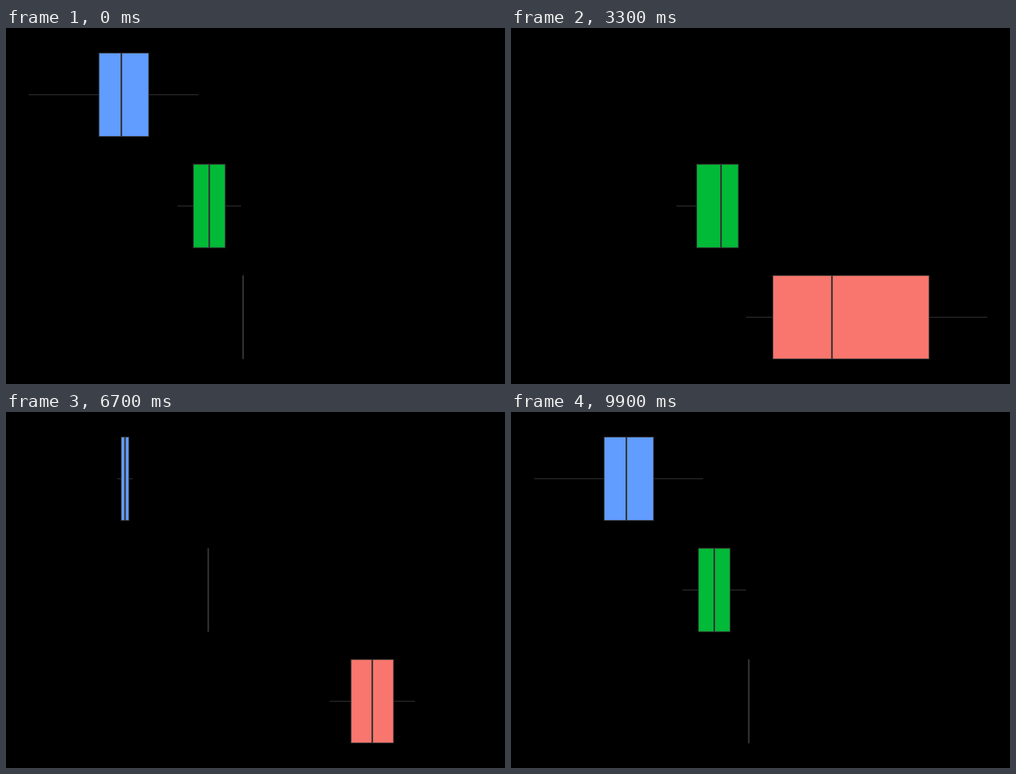
A matplotlib script that plays this animation: 885 px wide and 632 px high, repeating every 10000 ms.

```python
import math

import matplotlib.pyplot as plt
from matplotlib.animation import FuncAnimation
from matplotlib.patches import Rectangle

W, H, DPI = 885, 632, 64
FRAMES, INTERVAL = 100, 100
STEP = H / 3.2          # distance between the rows
HALF = 0.375 * STEP     # half the height of a box
INK = "#333333"
THIN, THICK = 1.42, 2.84

# Low whisker, quartiles and high whisker of each row in three states.
ROWS = [
    ("#619CFF", [(40.23, 164.9, 204.6, 253.1, 341.2), None,
                 (197.4, 204.25, 211.1, 217.95, 224.8)]),
    ("#00BA38", [(304, 332.25, 360.5, 388.75, 417),
                 (293.3, 329.3, 372.5, 403.2, 403.2), (358.7,) * 5]),
    ("#F8766D", [(420.5,) * 5, (417, 464.4, 569.2, 741.5, 844.77),
                 (574.2, 611.9, 649.6, 687.3, 725)]),
]
MOVES = [(11, 33), (45, 67), (79, 100)]  # first and last frame of each change


def px(width):
    return width * 72 / DPI


def progress(i):
    """State left, state approached and the eased share between them."""
    for n, (start, end) in enumerate(MOVES):
        if i < end:
            p = max(0, i - start) / (end - start)
            return n, (n + 1) % 3, (1 - math.cos(math.pi * p)) / 2
    return 0, 0, 0


def pose(states, i):
    """Five numbers and opacity; boxes leave by shrinking, enter by fading."""
    n, m, e = progress(i)
    a, b = states[n], states[m]
    if a is None:
        return b, e
    if b is None:
        b = (a[2],) * 5
    return [u + (v - u) * e for u, v in zip(a, b)], 1


class Box:
    def __init__(self, ax, row, color, states):
        self.states = states
        self.y = (0.6 + row) * STEP
        self.whiskers = [self.line(ax, THIN, 1 + 0.1 * k) for k in (0, 1)]
        self.rect = ax.add_patch(Rectangle(
            (0, self.y - HALF), 0, 2 * HALF, facecolor=color, edgecolor=INK,
            linewidth=px(THIN), joinstyle="miter", snap=False, zorder=2))
        self.median = self.line(ax, THICK, 3)
        self.parts = [*self.whiskers, self.rect, self.median]

    @staticmethod
    def line(ax, width, z):
        return ax.plot([], [], color=INK, lw=px(width), zorder=z, snap=False,
                       solid_capstyle="butt")[0]

    def update(self, i):
        (low, q1, mid, q3, high), alpha = pose(self.states, i)
        self.whiskers[0].set_data([low, q1], [self.y] * 2)
        self.whiskers[1].set_data([q3, high], [self.y] * 2)
        self.rect.set_x(q1)
        self.rect.set_width(q3 - q1)
        self.median.set_data([mid] * 2, [self.y - HALF, self.y + HALF])
        for part in self.parts:
            part.set_alpha(alpha)
            part.set_visible(alpha > 0)


fig = plt.figure(figsize=(W / DPI, H / DPI), dpi=DPI, facecolor="black")
ax = fig.add_axes([0, 0, 1, 1])
ax.axis("off")
boxes = [Box(ax, row, *spec) for row, spec in enumerate(ROWS)]
ax.set_xlim(0, W)
ax.set_ylim(H, 0)


def draw(i):
    for box in boxes:
        box.update(i)
    return [part for box in boxes for part in box.parts]


anim = FuncAnimation(fig, draw, frames=FRAMES, interval=INTERVAL,
                     init_func=lambda: draw(0), repeat=True, repeat_delay=0)
plt.show()
```
